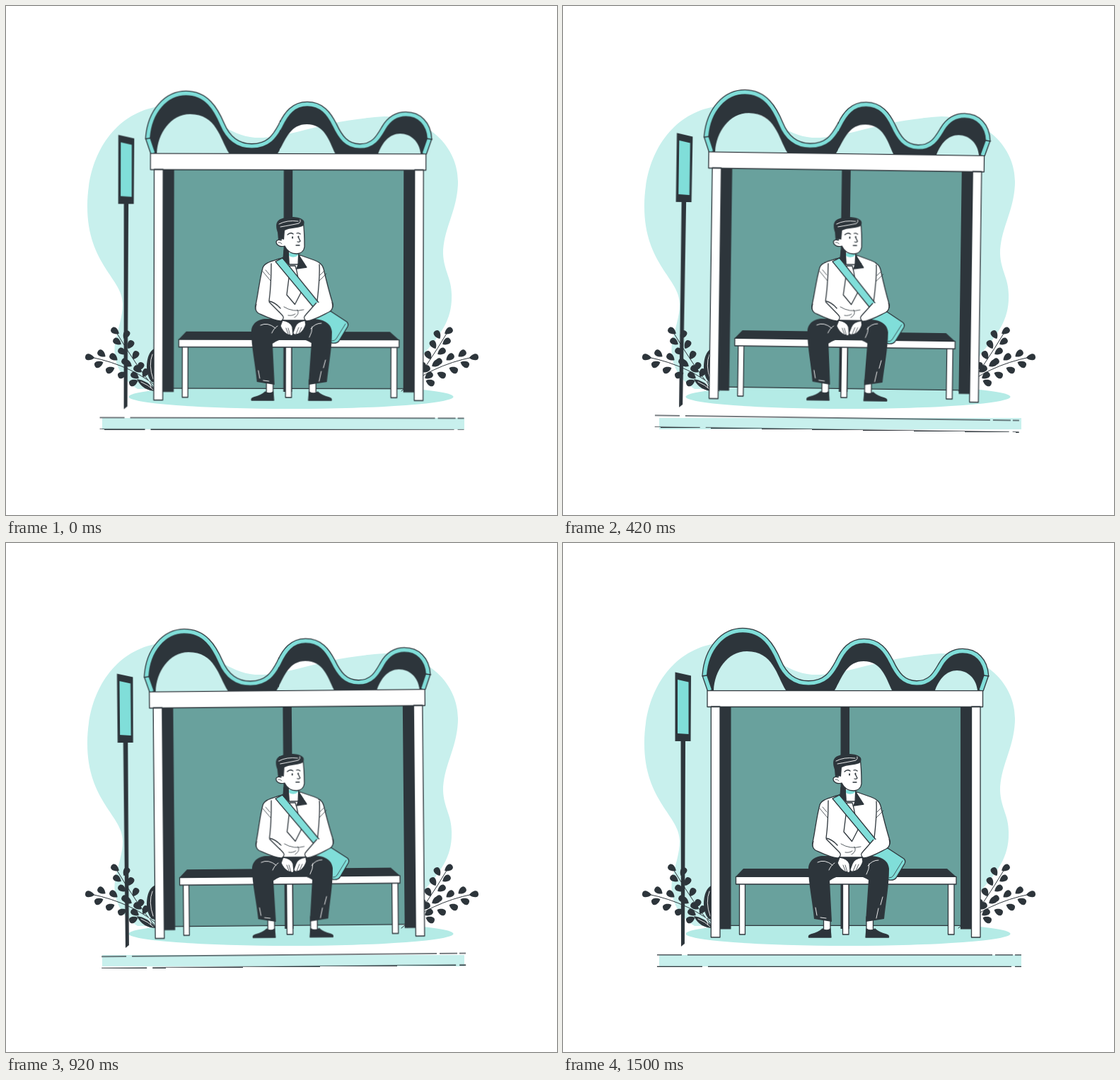
These frames come from a looping animation (779 by 719 pixels, 1.54 s). An HTML page:

```html
<!DOCTYPE html>
<html lang="en">
<head>
<meta charset="utf-8">
<title>Bus stop</title>
<style>
  html, body { margin: 0; width: 100%; height: 100%; overflow: hidden; background: #fff; }
  svg { display: block; width: 779px; height: 719px; }
  #sway { transform-origin: 389.5px 359.5px; }
  .ink { fill: #2d353b; }
  .pale { fill: #c8f0ed; }
  .teal { fill: #80ded9; }
  .glass { fill: #69a19d; }
  .line { fill: none; stroke: #2d353b; stroke-width: 1.3; stroke-linecap: round; stroke-linejoin: round; }
  .white { fill: #fff; }
  .edge { stroke: #2d353b; stroke-width: 1.3; stroke-linejoin: round; }
  .thin { stroke-width: .8; }
  .shine { fill: none; stroke: #fff; stroke-width: .9; stroke-linecap: round; }
</style>
</head>
<body>
<svg viewBox="0 0 779 719">
  <defs>
    <path id="wave" d="M207.5 208 L200.3 187 C203 148 227 123.7 254 123.7 C283 123.7 296 146 305 167 C313 186 326 198 347 198 C371 198 380 184 388 169 C396 152 406 138.7 425.5 138.7 C446 138.7 456 152 464 168 C472 185 481 198 500 198 C520 198 527 184 534 172 C541 160 550 152.7 565 152.7 C584 152.7 597 166 598.3 187 L591 208"/>
    <g id="plant">
      <path class="line" style="stroke-width:1" d="M221 544 Q180 508 120 496 M212 543 Q184 508 156 461"/>
      <g id="leaves" class="ink"></g>
    </g>
  </defs>

  <path class="pale" d="M115 283 C115 200 163 145 225 141 C280 139 305 182 352 186 C405 187 440 162 535 156 C598 157 640 200 639 250 C638 290 618 315 618 350 C619 375 631 385 630 412 C630 442 616 463 590 492 L575 535 L186 541 C160 525 151 500 154 478 C158 455 165 440 165 421 C165 385 115 365 115 283Z"/>
  <ellipse cx="403" cy="552" rx="229.5" ry="17" fill="#b4ebe6"/>
  <path class="pale" d="M136 582H648V598H136Z"/>
  <use href="#plant"/>
  <use href="#plant" transform="translate(780 0) scale(-1 1)"/>
  <path class="ink edge" d="M211 484 C198 490 196 518 206 530 L213 532Z"/>
  <path class="ink" d="M185 527 Q199 528 213 544 Q193 544 185 527Z"/>
  <path class="shine" d="M191 531 Q201 535 208 542 M202 529 L205 539 M207 492 Q201 507 208 527"/>

  <g id="sway">
    <path class="line" style="stroke-linecap:butt" d="M133 581.8H168 M176 581.8H607 M611 581.8H636 M639 581.8H648 M133 598.3H197 M205 598.3H634 M639 598.3H648"/>

    <path class="ink" d="M158.5 182.5 L181 187.5 L180.5 280 H158.5Z M166.5 279 H173 L172 566 L167 570Z"/>
    <path class="teal" d="M162 193 L177.5 196.5 V270 L162 269Z"/>

    <path class="glass" d="M237 231H562V541H237Z"/>
    <path class="line" d="M222 540.4H578"/>
    <path class="ink" d="M222 231H237.5V545.5H222Z M562 231H578V545.5H562Z M392.5 231H405V545H392.5Z"/>

    <path class="ink" d="M207.5 208 L200.3 187 C203 148 227 123.7 254 123.7 C283 123.7 296 146 305 167 C313 186 326 198 347 198 C371 198 380 184 388 169 C396 152 406 138.7 425.5 138.7 C446 138.7 456 152 464 168 C472 185 481 198 500 198 C520 198 527 184 534 172 C541 160 550 152.7 565 152.7 C584 152.7 597 166 598.3 187 L591 208 H586 C584 191 572 180 557 180 C542 180 532 192 526 208 H465 C456 189 450 167 425 167 C401 167 395 189 384 208 H315 C302 187 297 153 260 153 C232 153 214 181 213 208Z"/>
    <use href="#wave" class="line" style="stroke-width:7.8;stroke-linecap:butt;stroke-linejoin:miter"/>
    <use href="#wave" fill="none" stroke="#80ded9" stroke-width="5.2"/>
    <path class="line" d="M197 188L203.5 187 M595 187L602 188"/>

    <g class="white edge">
      <path d="M209.3 231H222V557H209.3Z M577.5 231H590V557H577.5Z M204 208.6H593.5V231.5H204Z"/>
      <path d="M249.5 480H257.5V553H249.5Z M395.5 480H404V553H395.5Z M544.5 480H553V553H544.5Z"/>
    </g>
    <path class="ink" d="M255 460H543L556.5 472H243.5Z"/>
    <path class="white edge" d="M244.5 471.3H556V482H244.5Z"/>

    <!-- bag -->
    <path class="teal edge" d="M436 431 L459 431 L482 446 Q485 449 483 453 L471 473 Q468 477 461 476 L440 464Z"/>
    <path class="line thin" d="M480 449 L467 470 Q465 473 461 473"/>

    <!-- legs -->
    <path class="white edge" d="M368.5 528H378V548H368.5Z M429 528H438.5V548H429Z"/>
    <path class="ink edge" d="M347.5 557 Q347 554 351 553 Q362 550 367 545 Q373 549 378 545 L379 557Z M460.5 557 Q461 554 457 553 Q446 550 441 545 Q435 549 429 545 L428 557Z"/>
    <path class="ink" d="M384 442 H428 C446 441 460 446 461 460 C461 485 456 509 454 531 L428 535 L432 476 Q424 471 416 470 H393 Q386 471 377 477 L380 535 L355 531 C353 507 347 482 347 460 C347 448 358 441 370 442Z"/>
    <path class="shine" d="M360 451 Q370 446 381 455 M431 456 Q437 448 446 448 M376 462 Q379 455 384 452 M429 468 Q433 461 433 453 M359 526 L357 515 M364 529 L372 530 M443 530 L446 516 M449 511 L452 500"/>

    <!-- shirt -->
    <path class="white edge" d="M392 355 C380 360 366 361 363 370 C358 389 357 404 353 423 Q351 430 359 434 L383 444 H427 L456 431 Q464 427 462 420 C457 404 453 388 449 371 Q447 363 436 359 L416 352Z"/>
    <path class="line" d="M375 364 C375 383 374 402 372 417 Q380 418 388 427 M443 365 C444 383 442 400 440 417"/>
    <path class="line thin" d="M363 375 L374 388 M367 373 L373 380 M443 388 L453 378 M444 380 L449 375 M393 425 Q406 433 421 429 M408 440 Q416 435 412 429 M399 437 Q405 438 409 435"/>
    <path class="white edge" d="M401 367 H409 L411 374 L417 405 L408.5 421.5 L397 408 L401 376Z"/>
    <path class="teal edge" d="M381 361 L391 356 L443 420 L436 427Z"/>

    <!-- forearms and hands -->
    <path class="white edge" d="M372 418 L390 436 Q395 441 389 445 C380 445 368 439 357 434 Q351 430 354 421 M439 419 L424 436 Q419 441 425 445 C436 444 447 437 457 432 Q464 428 461 418"/>
    <path class="white edge" d="M391 444 Q402 445 405 453 L406 463 Q405 467 402 465 L398 464 Q391 460 388 452Z M423 444 Q411 446 409 453 L406 461 Q406 465 411 464 L415 463 Q422 458 424 450Z"/>
    <path class="line thin" d="M399 455 L402 465 M396 455 L399 463 M414 454 L410 464 M418 454 L414 463"/>

    <!-- neck and collar -->
    <path class="white edge" d="M399 341 L400 365 H413 L414 345Z"/>
    <path class="teal" d="M400 349 H413 V352 Q407 357 400 353Z"/>
    <path class="ink edge" d="M393 345 L399 348 L400 365 L392 357Z M414 352 L425 369 L411 371 L414 363Z"/>

    <!-- head -->
    <path class="white edge" d="M390 312 L394 304 H420 C422 317 422 331 422 340 Q421 349 411 350 Q399 350 394 339 C388 341 382 338 382 333 Q383 329 389 331Z"/>
    <path class="ink" d="M385 331 L384 320 C381 312 381 304 388 301 C396 297 413 297 418 301 C423 303 422 309 419 311 C411 314 402 313 394 317 L393 330 Q389 328 385 331Z"/>
    <path class="shine" d="M386 308 Q397 302 413 304 M388 312 Q405 309 414 307 Q417 305 416 302"/>
    <path class="line" d="M398 323 Q402 319 406 322 M411 321 Q414 320 416 322 M413 326 L416 332 Q415 334 412 333 M410 338 L415 338"/>
    <path class="line thin" d="M385 334 Q388 333 390 336"/>
    <ellipse class="ink" cx="405" cy="327" rx="1" ry="1.7"/>
    <ellipse class="ink" cx="413.5" cy="326" rx=".9" ry="1.5"/>
  </g>
</svg>
<script>
  const addLeaves = (angle, spots) => {
    for (const [x, y] of spots) {
      const leaf = document.createElementNS('http://www.w3.org/2000/svg', 'path');
      leaf.setAttribute('d', 'M7 0C3-5-6-7-6 0C-6 7 3 5 7 0Z');
      leaf.setAttribute('transform', `translate(${x} ${y}) rotate(${angle})`);
      document.getElementById('leaves').append(leaf);
    }
  };
  addLeaves(8, [[118, 496]]);
  addLeaves(38, [[135, 491], [152, 496], [169, 503], [186, 513]]);
  addLeaves(-24, [[131, 506], [147, 514], [164, 521], [180, 532]]);
  addLeaves(35, [[154, 459], [157, 474], [164, 488], [172, 505], [182, 522]]);
  addLeaves(120, [[170, 464], [176, 478], [183, 493], [190, 509], [197, 518]]);

  // Linear rocking: [time in ms, degrees]
  const loop = 1540;
  const rock = [[0, .11], [345, 1], [1100, -1], [loop, .11]];
  document.getElementById('sway').animate(
    rock.map(([t, deg]) => ({ offset: t / loop, transform: `rotate(${deg}deg)` })),
    { duration: loop, iterations: Infinity }
  );
</script>
</body>
</html>
```
